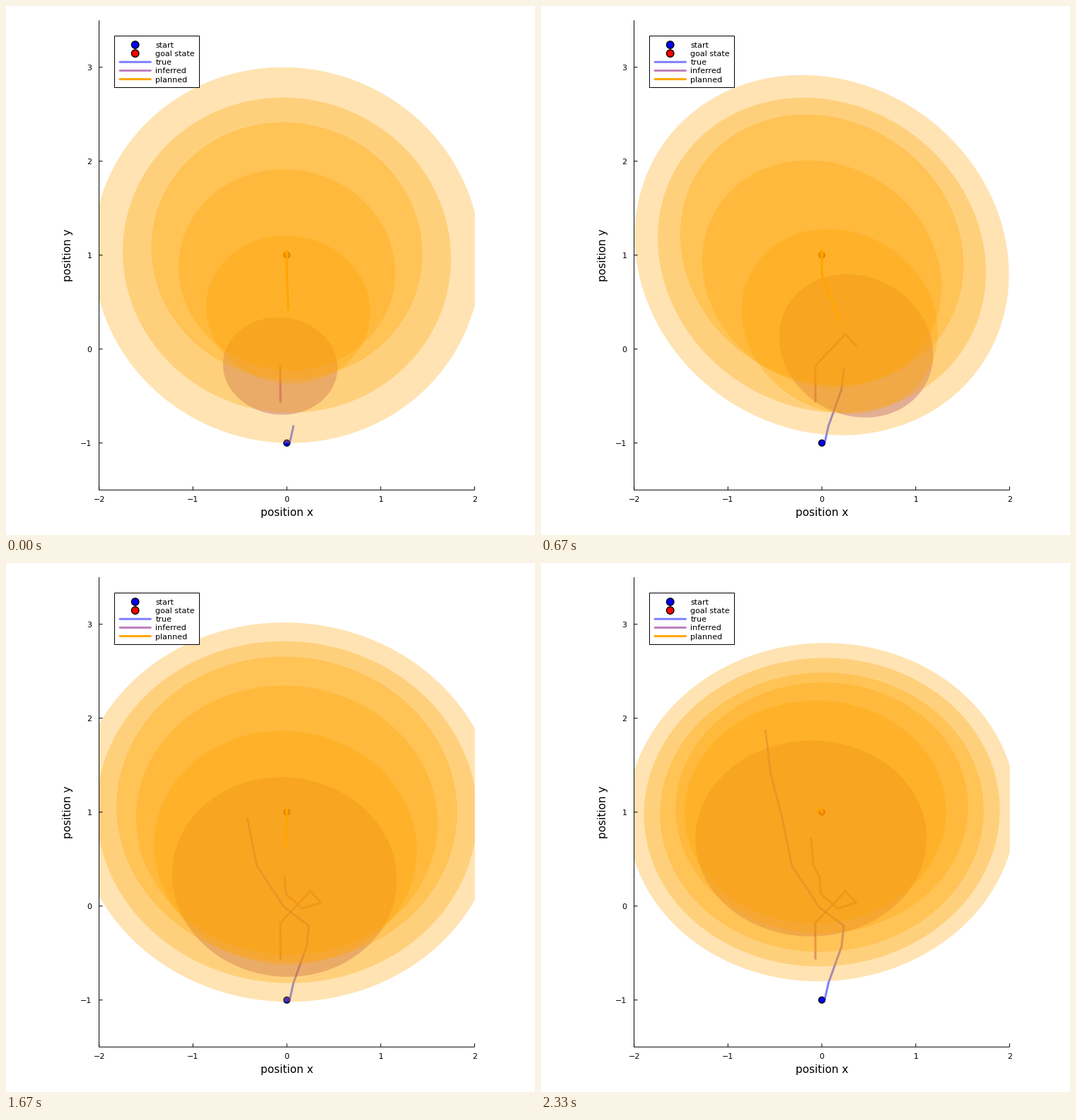
Write a matplotlib script that moves like this. It is 748 px wide and 749 px high and loops after 2.66 s.

```python
import numpy as np
import matplotlib.pyplot as plt
from matplotlib.animation import FuncAnimation
from matplotlib.patches import Circle, Polygon, Rectangle

W, H, DPI = 748, 749, 128
PT = 72 / DPI  # points per pixel
STEPS, RINGS = 8, 6
GOAL_X, GOAL_Y = 397.1, 352.75
UNIT_X, UNIT_Y = 132.75, 133
ORANGE, PURPLE = "#ffa500", "#800080"

plt.rcParams["font.family"] = "DejaVu Sans"


def px(x):
    return GOAL_X + UNIT_X * x


def py(y):
    return GOAL_Y - UNIT_Y * (y - 1)


def to_px(*points):
    x, y = np.array(points).T
    return np.column_stack([px(x), py(y)])


LEFT, RIGHT, TOP, BOTTOM = px(-2), px(2), py(3.5), py(-1.5)

true_path = to_px((.03, -1), (.07, -.82), (.21, -.43), (.235, -.21), (-.03, -.01),
                  (-.32, .43), (-.42, .93), (-.545, 1.41), (-.6, 1.87))
inferred_path = to_px((-.068, -.56), (-.07, -.18), (.25, .16), (.365, .035),
                      (.165, -.025), (-.01, .13), (-.025, .31), (-.09, .43),
                      (-.115, .72))
# First planned position of every step
next_pos = to_px((.015, .42), (.12, .48), (.19, .295), (-.025, .395),
                 (.013, .53), (-.015, .62), (-.045, .72), (-.07, 1))
outer_height = [266, 267.5, 255, 269.5, 273.5, 268.5, 255, 239.5]

ANGLE = np.linspace(0, 2 * np.pi, 240)


def grow(k, peak, power):
    return np.sin(np.pi / 2 * k / peak) ** power


def spread(outer, belief, k):
    """Half sizes from the furthest prediction down to the current belief."""
    f = np.linspace(0, 1, RINGS)
    bow = 6 + 16 * .4 ** k
    return outer + (belief - outer) * f - bow * f * (1 - f)


def half_sizes(k):
    h = outer_height[k]
    w = h * (1.03 + .125 / (1 + np.exp(1.1 * (4.5 - k))))
    return (spread(w, 81 + 84.5 * grow(k, 6.3, 1.5), k),
            spread(h, 69 + 74.5 * grow(k, 5.8, 1.25), k))


def tilts(k):
    outer = .13 * np.exp(-((k - 2.4) / 2.2) ** 2) - .02
    return outer + np.linspace(0, .015, RINGS)


def plan_points(k):
    """Planned positions, settling on the goal after a slight overshoot."""
    x, y = next_pos[k]
    d = y - GOAL_Y
    ys = [y, GOAL_Y + .35 * d - 6, GOAL_Y - .08 * d, GOAL_Y, GOAL_Y]
    return np.column_stack([[x] + [GOAL_X] * 4, ys])


def ellipse(center, w, h, rho):
    c, s = np.cos(ANGLE), np.sin(ANGLE)
    return np.column_stack([center[0] + w * c,
                            center[1] + h * (rho * c + np.sqrt(1 - rho ** 2) * s)])


fig = plt.figure(figsize=(W / DPI, H / DPI), dpi=DPI, facecolor="white")
ax = fig.add_axes([0, 0, 1, 1])
ax.set_xlim(0, W)
ax.set_ylim(H, 0)
ax.axis("off")


def line(xs, ys, color="black", width=1, alpha=1, z=10):
    cap = "round" if width > 1 else "butt"
    return ax.plot(xs, ys, color=color, lw=width * PT, alpha=alpha, zorder=z,
                   solid_capstyle=cap, solid_joinstyle="round", snap=False)[0]


def dot(x, y, color, radius, z):
    ax.add_patch(Circle((x, y), radius, fc=color, ec="black",
                        lw=1.4 * PT, zorder=z))


def label(x, y, text, size=11.1, ha="center", rotation=0):
    ax.text(x, y, text, fontsize=size * PT, ha=ha, va="baseline", zorder=13,
            rotation=rotation, rotation_mode="anchor")


# Axes
line([LEFT, LEFT], [TOP, BOTTOM])
line([LEFT, RIGHT], [BOTTOM, BOTTOM])
for v in range(-2, 3):
    line([px(v)] * 2, [BOTTOM - 5, BOTTOM])
    label(px(v), 702, str(v).replace("-", "\u2212"))
for v in range(-1, 4):
    line([LEFT, LEFT + 5], [py(v)] * 2)
    label(121.5, py(v) + 4.4, str(v).replace("-", "\u2212"), ha="right")
label(GOAL_X, 722, "position x", 15.3)
label(92, GOAL_Y, "position y", 15.3, rotation=90)

# Legend
ax.add_patch(Rectangle((153.5, 42.5), 120, 73, fc="white", ec="black",
                       lw=PT, zorder=11, snap=False))
STYLES = {"true": ("blue", .5), "inferred": (PURPLE, .5), "planned": (ORANGE, 1)}
for i, name in enumerate(["start", "goal state", *STYLES]):
    y = 55 + 12.15 * i
    label(211.5, y + 4, name, ha="left")
    if name in STYLES:
        color, alpha = STYLES[name]
        line([161, 204.5], [y, y], color, 3, alpha, 12)
    else:
        dot(182.7, y, ("blue", "red")[i], 5.2, 12)

# Scene
dot(GOAL_X, py(-1), "blue", 4.4, 1)
dot(GOAL_X, GOAL_Y, "red", 4.4, 1)
true_line = line([], [], "blue", 3, .5, 2)
inferred_line = line([], [], PURPLE, 3, .5, 3)
plan_line = line([], [], ORANGE, 3, 1, 6)

window = Rectangle((LEFT, TOP), RIGHT - LEFT, BOTTOM - TOP, transform=ax.transData)
blobs = []
for i in range(RINGS):
    belief = i == RINGS - 1
    blob = Polygon([(0, 0), (1, 0), (0, 1)], fc=PURPLE if belief else ORANGE,
                   ec="none", lw=0, alpha=.3, zorder=4 if belief else 5)
    ax.add_patch(blob)
    blob.set_clip_path(window)
    blobs.append(blob)


def draw(k):
    plan = plan_points(k)
    true_line.set_data(*true_path[:k + 2].T)
    inferred_line.set_data(*inferred_path[:k + 2].T)
    plan_line.set_data(*plan.T)
    centers = [*plan[::-1], inferred_path[k + 1]]
    for blob, *shape in zip(blobs, centers, *half_sizes(k), tilts(k)):
        blob.set_xy(ellipse(*shape))
    return [true_line, inferred_line, plan_line, *blobs]


anim = FuncAnimation(fig, draw, frames=STEPS, interval=2660 / STEPS,
                     repeat=True, repeat_delay=0, blit=False)
plt.show()
```
